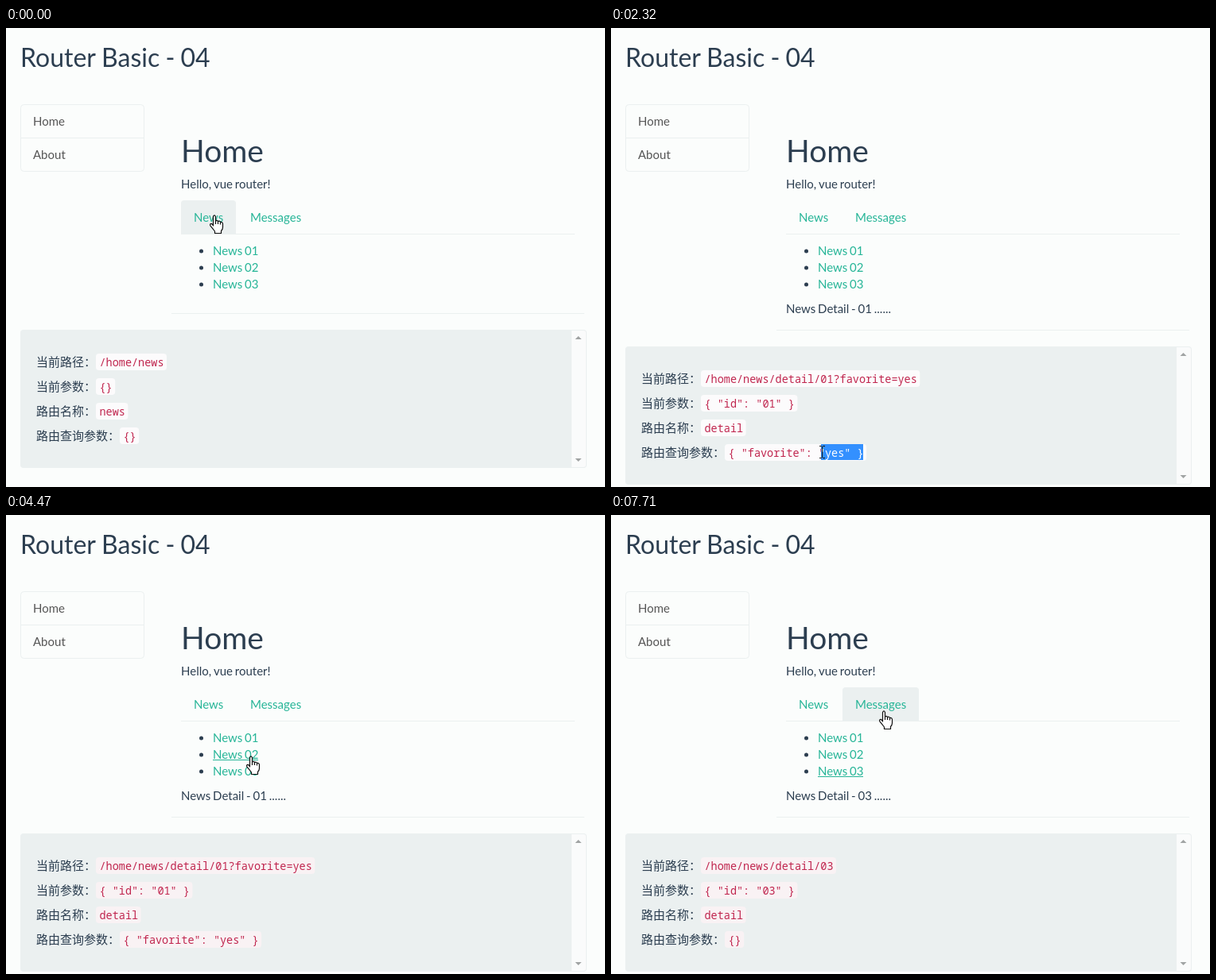
Write an HTML page with a canvas that moves like this. It is 753 by 578 pixels and loops after 8000 ms.

```html
<!DOCTYPE html>
<html lang="zh">
<head>
<meta charset="utf-8">
<title>Router Basic - 04</title>
<style>
  html, body { margin: 0; width: 100%; height: 100%; overflow: hidden; background: #fbfdfc; }
  canvas { display: block; }
</style>
</head>
<body>
<canvas id="stage" width="753" height="578"></canvas>
<script>
const ctx = document.getElementById('stage').getContext('2d', { alpha: false });
const LOOP = 8000;
const INK = '#2c3e50', LINK = '#26b597', PANEL = '#ebf0f0', CODE = '#c0254e', PAGE = '#fbfdfc';
const MONO = '13.5px "Noto Sans Mono", monospace';
const lato = size => `${size}px Lato, sans-serif`;

const shapes = {
  arrow: new Path2D('M.5 .5V16.5L4.2 13L6.7 18.5L9.2 17.4L6.8 12H11.8Z'),
  hand: new Path2D('M4.5 14V2.4Q6 -.6 7.5 2.4V8Q9.6 6.3 10.5 8.7Q12.6 7.4 13.5 9.6Q16.2 8.8 16.5 11.5V16Q16.5 18.5 14.5 20.5V23.5H6.5V21Q3.5 17 .8 13.8Q0 11.4 2.2 11.4Q3.6 12 4.5 14ZM7.5 8V12M10.5 9V12M13.5 10V12.5'),
  beam: new Path2D('M0 .5H2.5L3.5 1.5L4.5 .5H7M3.5 1V15M0 15.5H2.5L3.5 14.5L4.5 15.5H7')
};

// time, shape, left, top
const cursorSteps = [
  [0, 'hand', 256, 235], [560, 'arrow', 262, 402], [720, 'arrow', 261, 420],
  [870, 'arrow', 312, 345], [990, 'hand', 338, 241], [1110, 'arrow', 332, 272],
  [1260, 'hand', 304, 277], [1390, 'hand', 295, 277], [1540, 'hand', 293, 285],
  [1660, 'hand', 293, 291], [1780, 'beam', 376, 429], [1930, 'beam', 338, 500],
  [2080, 'beam', 318, 530], [2200, 'beam', 300, 532], [2320, 'beam', 262, 526],
  [2480, 'beam', 140, 470], [2600, 'beam', 53, 438], [2720, 'beam', 36, 438],
  [2860, 'beam', 20, 438], [3140, 'arrow', 190, 455], [3260, 'arrow', 347, 476],
  [3410, 'arrow', 368, 478], [3530, 'arrow', 373, 478], [3680, 'arrow', 389, 450],
  [3800, 'arrow', 358, 418], [3950, 'arrow', 359, 422], [4100, 'arrow', 376, 390],
  [4220, 'arrow', 352, 345], [4340, 'hand', 308, 308], [4470, 'hand', 302, 303],
  [4590, 'hand', 301, 303], [5400, 'hand', 308, 326], [7290, 'hand', 313, 320],
  [7440, 'arrow', 339, 285], [7560, 'hand', 338, 254], [7710, 'hand', 337, 246]
];

// time, first selected row, left edge in that row
const selectionSteps = [
  [0, 4, 0], [2200, 3, 301], [2320, 3, 264], [2480, 1, 144],
  [2600, 0, 53], [2720, 0, 38], [3410, 4, 0]
];

const stepAt = (steps, t) => steps.findLast(step => step[0] <= t);
const between = (t, a, b) => t >= a && t < b;

function text(string, x, y, font, color, wordSpacing = '0px') {
  ctx.font = font;
  ctx.wordSpacing = wordSpacing;
  ctx.fillStyle = color;
  ctx.fillText(string, x, y);
}

const prose = (string, x, y, size, color) => text(string, x, y, lato(size), color, '-1px');

function rect(x, y, w, h, color) {
  ctx.fillStyle = color;
  ctx.fillRect(x, y, w, h);
}

function rounded(x, y, w, h, radius, color, stroke) {
  ctx.beginPath();
  ctx.roundRect(x, y, w, h, radius);
  ctx.fillStyle = ctx.strokeStyle = color;
  stroke ? ctx.stroke() : ctx.fill();
}

function triangle(x, y, dy) {
  ctx.beginPath();
  ctx.moveTo(x - 4, y);
  ctx.lineTo(x + 4, y);
  ctx.lineTo(x, y + dy);
  ctx.fillStyle = '#a0a3a3';
  ctx.fill();
}

function drawPage(t, id) {
  rect(0, 0, 753, 578, PAGE);
  prose('Router Basic - 04', 18, 49, 32, INK);
  rounded(18.5, 96.5, 155, 84, 4, PANEL, true);
  rect(19, 138, 154, 1, PANEL);
  prose('Home', 34, 123, 15, '#555');
  prose('About', 34, 165, 15, '#555');
  prose('Home', 220, 169, 39, INK);
  prose('Hello, vue router!', 220, 202, 15, INK);

  rect(220, 259, 495, 1, PANEL);
  if (t < 1540) rounded(220, 217, 69, 43, [4, 4, 0, 0], PANEL);
  if (between(t, 990, 1110) || t >= 7560) rounded(291, 217, 96, 43, [4, 4, 0, 0], PANEL);
  prose('News', 236, 244, 15, LINK);
  prose('Messages', 307, 244, 15, LINK);

  const underlined = [between(t, 1260, 2080), between(t, 4340, 6110), t >= 5400];
  underlined.forEach((line, i) => {
    const y = 286 + i * 21;
    ctx.beginPath();
    ctx.arc(245.5, y - 5, 2.5, 0, 7);
    ctx.fillStyle = INK;
    ctx.fill();
    prose('News 0' + (i + 1), 260, y, 15, LINK);
    if (line) rect(260, y + 1, 57, 1, LINK);
  });
  if (id) prose(`News Detail - ${id} ......`, 220, 359, 15, INK);
}

function drawPanel(t, id) {
  const top = id ? 401 : 380;
  rect(208, top - 21, 519, 1, PANEL);
  rounded(18, top, 712, 174, 4, PANEL);
  rounded(711, top + 1, 18, 172, [0, 3, 3, 0], '#fafbfb');
  triangle(719.5, top + 12, -4);
  triangle(719.5, top + 162, 4);

  const favorite = id === '01';
  const rows = [
    ['当前路径：', id ? `/home/news/detail/${id}${favorite ? '?favorite=yes' : ''}` : '/home/news'],
    ['当前参数：', id ? `{ "id": "${id}" }` : '{}'],
    ['路由名称：', id ? 'detail' : 'news'],
    ['路由查询参数：', favorite ? '{ "favorite": "yes" }' : '{}']
  ];
  const [, firstRow, left] = stepAt(selectionSteps, t);
  rows.forEach(([label, code], i) => {
    const y = top + 46 + i * 31;
    const codeX = 38 + label.length * 15;
    const codeWidth = code.length * 8.1;
    const write = (labelColor, codeColor) => {
      text(label, 38, y, '15px "Noto Sans CJK SC", "Noto Sans CJK", sans-serif', labelColor);
      text(code, codeX + 4.5, y, MONO, codeColor);
    };
    rounded(codeX, y - 16, codeWidth + 8, 21, 4, t < 3410 ? '#fcfbfc' : '#f9f2f4');
    write(INK, CODE);
    if (i < firstRow) return;

    const start = i === firstRow ? left : 38;
    const end = codeX + 4 + codeWidth + (i < 3 ? 8 : 0);
    ctx.save();
    ctx.beginPath();
    if (start < codeX) ctx.rect(start, y - 16, codeX - start, 20);
    const codeStart = Math.max(start, codeX + 4);
    ctx.rect(codeStart, y - 16, end - codeStart, 20);
    ctx.clip();
    rect(0, y - 16, 753, 20, '#3390ff');
    write('#fff', '#fff');
    ctx.restore();
  });
}

function drawCursor(t) {
  const [, shape, x, y] = stepAt(cursorSteps, t);
  ctx.save();
  ctx.translate(x, y);
  ctx.lineJoin = 'round';
  ctx.lineWidth = shape === 'hand' ? 1.2 : 1;
  ctx.fillStyle = '#fff';
  ctx.strokeStyle = '#111';
  if (shape !== 'beam') ctx.fill(shapes[shape]);
  ctx.stroke(shapes[shape]);
  ctx.restore();
}

function frame() {
  const t = performance.now() % LOOP;
  const id = t < 1540 ? '' : t < 4740 ? '01' : t < 6270 ? '02' : '03';
  drawPage(t, id);
  drawPanel(t, id);
  drawCursor(t);
  requestAnimationFrame(frame);
}
frame();
</script>
</body>
</html>
```
